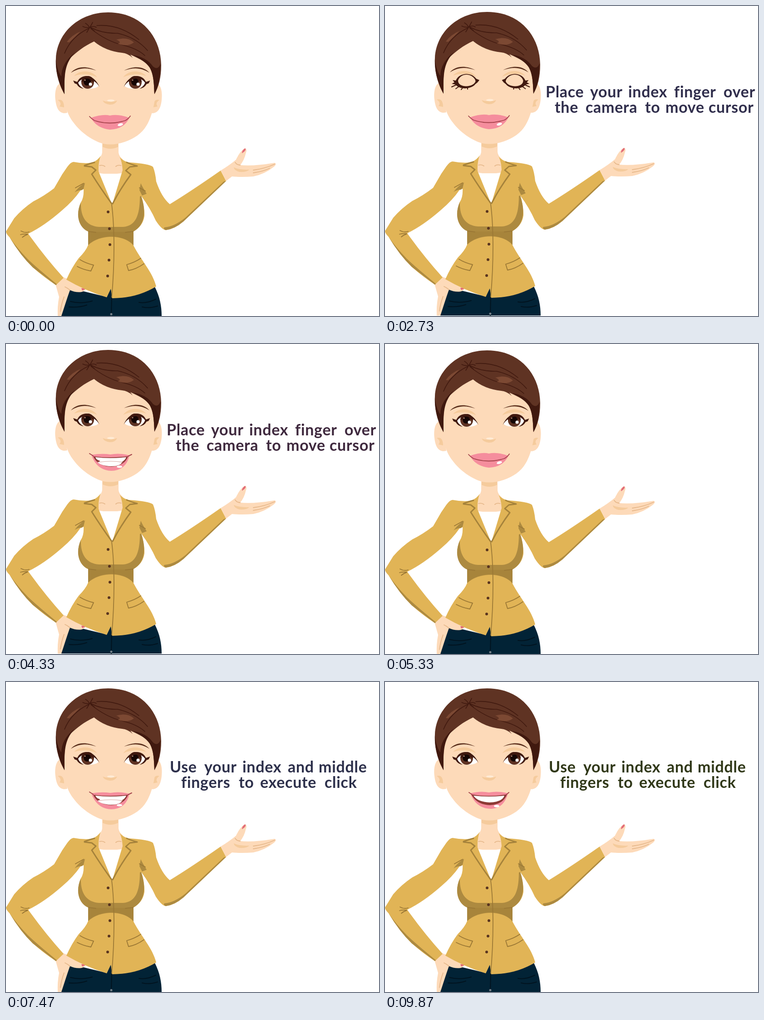
Recreate the animation shown at these times as an HTML page. Size 822 by 682 pixels, loop 9.94 s.

```html
<!DOCTYPE html>
<html lang="en">
<head>
<meta charset="utf-8">
<title>Presenter</title>
<style>
  html, body { margin: 0; width: 100%; height: 100%; overflow: hidden; background: #fff; }
  svg { display: block; width: 822px; height: 682px; }
  text { font: 700 34px Lato, "Open Sans", sans-serif; letter-spacing: .7px; font-variant-ligatures: none; }
  .skin { fill: #fddab9; }
  .tan { fill: #f5cb9c; }
  .hair { fill: #5f3323; }
  .dark { fill: #40190f; }
  .gold { fill: #e1b456; }
  .shade { fill: #ad8a40; }
  .navy { fill: #022336; }
  .lip { fill: #f58d9d; }
  .deep { fill: #8d3a35; }
  .white { fill: #fff; }
  .line { fill: none; stroke-linecap: round; stroke-linejoin: round; }
  .seam { stroke: #9b7835; stroke-width: 1.8; }
  .lapel { stroke: #a5823b; stroke-width: 3; }
  .strand { stroke: #40190f; stroke-width: 1.6; }
  .crease { stroke: #e6b88b; stroke-width: 1.8; }
  .lash { stroke: #40190f; stroke-width: 2; }
</style>
</head>
<body>
<svg viewBox="0 0 822 682">
  <defs>
    <g id="ear">
      <path class="skin" d="M130 172C114 163 106 183 109 207C111 227 119 239 135 235Z"/>
      <path class="tan" d="M114 207C124 204 128 212 128 223L118 221Q124 213 114 207Z"/>
    </g>
    <g id="brow">
      <path class="tan" d="M150 154C163 140 188 140 201 157C188 150 166 148 150 154Z"/>
      <path d="M143 147C154 134 175 130 199 142C176 134 160 136 143 147Z" fill="#5a2f1c"/>
    </g>
    <g id="white">
      <path class="white" d="M157 168C164 150 192 148 204 176C196 184 166 186 157 168Z"/>
    </g>
    <g id="lid">
      <path class="dark" d="M148 164L157 167C165 149 193 147 206 178C194 158 169 153 159 169Q162 177 171 182Q160 180 156 172L151 170Z"/>
    </g>
    <g id="shut">
      <path class="dark" d="M149 164L156 165C164 147 190 146 201 161L208 164Q205 169 199 173C190 185 163 185 156 174L147 172L153 169Z"/>
      <path class="skin" d="M161 165C167 148 191 148 199 164Q201 169 193 174C183 180 161 179 161 165Z"/>
      <path class="line lash" d="M158 174L147 179M163 178L156 183M171 181L168 185M182 181L182 184"/>
    </g>
    <g id="iris">
      <circle r="14" class="hair"/>
      <path class="dark" d="M-14 0A14 14 0 0 1 14 0Q0 -8 -14 0Z"/>
      <circle r="8" cx="-1" cy="-1" fill="#150604"/>
      <circle r="3.5" cx="6" cy="4" class="white"/>
      <circle r="1.5" cx="-6" cy="-5" fill="#b98d78"/>
    </g>
  </defs>

  <g id="woman">
    <!-- trousers and hand on hip -->
    <path class="navy" d="M139 620L222 640L231 621L235 641Q290 640 328 618C339 640 343 660 343 682H114Z"/>
    <path class="line" stroke="#01131f" stroke-width="2" d="M233 640L232 682M142 650Q165 656 190 649M139 662Q160 664 178 658M330 645Q310 655 293 652M334 660Q315 666 300 662"/>
    <circle cx="232" cy="678" r="2.5" fill="#74808a"/>
    <path class="skin" d="M109 612L127 597Q142 602 156 613L175 621Q176 626 167 629Q154 631 141 625C134 644 128 664 122 682H114Q113 660 117 640Z"/>
    <path class="line crease" d="M141 625Q135 620 130 618M128 640Q122 656 120 672"/>
    <path d="M166 621Q172 620 175 623L168 626Z" fill="#e26b78"/>

    <!-- neck and shirt -->
    <path class="skin" d="M212 294V322Q211 331 203 338V369H258V338Q249 331 248 322V294Z"/>
    <path class="tan" d="M213 302Q230 306 247 302V310Q230 318 213 310Z"/>
    <path class="line crease" d="M206 351Q213 349 218 353M254 351Q246 349 242 353"/>
    <path class="white" d="M202 367Q230 373 259 367L234 438Z"/>

    <!-- jacket -->
    <path class="gold" d="M209 329Q204 338 190 345Q169 347 149 343Q143 343 135 354L124 370L106 401Q84 418 60 430Q36 446 18 467L0 496Q0 501 8 509Q32 549 59 575Q84 597 110 614L127 598Q87 554 49 501Q84 484 123 450Q149 428 164 406L171 403Q172 421 165 432Q157 452 160 467Q165 486 181 496V526Q176 539 160 555Q145 575 133 602Q174 626 222 641L231 622L234 643Q288 643 331 617C323 585 298 560 281 527V496Q302 484 305 462Q306 443 298 418Q318 445 330 472Q343 492 352 493Q371 491 391 474L485 385L473 362Q407 408 361 436Q343 421 331 386Q329 366 324 354Q316 347 270 344Q253 339 248 328Q256 340 257 361L234 437L204 364Q203 343 209 329Z"/>
    <path class="shade" d="M165 432C164 463 176 484 205 486H258C285 484 295 462 295 419L298 418C309 450 307 482 281 496V527C260 501 206 501 181 526V496C157 485 154 455 165 432Z"/>
    <path d="M181 497H281V526C259 502 207 502 181 526Z" fill="#a07d35" opacity=".45"/>
    <path class="shade" d="M174 389Q162 396 151 410Q159 405 167 405L171 402ZM297 390Q301 399 310 413L300 417L294 405ZM352 493Q346 490 349 487Q372 485 396 465L480 386L485 385L391 474Q371 491 352 493ZM8 509Q32 549 59 575L110 614L112 612Q69 577 48 557Q24 532 8 509Z"/>
    <path class="line seam" d="M33 495Q42 500 51 497M32 503Q40 501 48 502M36 509Q42 504 47 503M153 400L171 390M294 400L307 407M182 496L198 498M280 496L263 498"/>
    <path class="line seam" d="M233 437C238 475 241 550 233 641M163 558Q176 566 193 570L187 583Q170 580 157 573M297 555Q284 564 266 569L270 582Q287 579 304 567"/>
    <path class="line lapel" d="M173 351Q186 346 195 344M173 352L189 354L198 361L189 370Q209 402 233 435M289 352Q275 348 266 344M289 352L273 354L264 362L275 371Q252 402 235 435"/>
    <g fill="#59341f">
      <circle cx="225" cy="453" r="3"/><circle cx="228" cy="490" r="3"/><circle cx="229" cy="525" r="3"/>
      <circle cx="227" cy="559" r="3"/><circle cx="224" cy="594" r="3"/>
    </g>

    <!-- open hand -->
    <path class="skin" d="M473 362Q493 350 507 338Q515 320 526 313Q532 314 529 322Q525 340 516 350Q545 353 592 345Q598 347 590 354Q570 370 545 375Q520 377 498 375L485 385Z"/>
    <path class="tan" d="M502 355Q514 361 536 360Q531 366 515 365Q503 362 502 355Z"/>
    <path class="line crease" d="M516 350Q509 350 505 344M545 361Q570 358 592 348M545 367Q567 364 581 357"/>
    <path d="M520 324Q520 317 527 313Q531 317 520 324Z" fill="#e26b78"/>

    <!-- head -->
    <use href="#ear"/><use href="#ear" transform="translate(452) scale(-1 1)"/>
    <path class="skin" d="M124 120L129 195C130 226 138 243 150 258C165 278 190 296 214 303Q230 306 246 303C269 299 292 287 305 270C316 255 324 235 329 200L332 120L192 70Z"/>
    <path class="hair" d="M129 194C118 175 108 146 110 115C113 57 163 14 225 14C296 14 341 65 342 130Q342 169 327 194C326 163 324 149 317 136C310 123 296 117 274 107L279 114Q268 104 256 103Q219 99 194 78C172 88 155 102 142 114C131 126 128 143 129 194Z"/>
    <path class="dark" d="M129 194C118 175 109 148 110 118Q113 143 122 155Q122 126 152 102C131 126 128 143 129 194ZM327 194C326 163 324 149 317 136Q306 120 279 108Q309 112 324 133Q335 142 340 128Q341 169 327 194Z"/>
    <g class="line strand">
      <path d="M169 45Q178 49 184 47Q193 43 199 47M175 38Q182 42 184 48L178 58M191 36L185 47L195 55M186 47Q213 61 246 60Q287 69 312 98M187 50Q222 78 258 86Q290 94 306 109M183 49Q144 67 129 104M200 43Q250 39 293 74"/>
    </g>
    <path d="M243 74Q267 67 282 80Q268 91 246 83Q257 80 243 74ZM134 79Q145 64 164 56Q153 68 139 80Z" fill="#865139" opacity=".75"/>
    <use href="#brow"/><use href="#brow" transform="translate(459) scale(-1 1)"/>
    <g id="open">
      <use href="#white"/><use href="#white" transform="translate(465.5) scale(-1 1)"/>
      <use href="#iris" x="180" y="168"/><use href="#iris" x="285" y="168"/>
      <use href="#lid"/><use href="#lid" transform="translate(465.5) scale(-1 1)"/>
    </g>
    <g id="closed">
      <use href="#shut"/><use href="#shut" transform="translate(465.5) scale(-1 1)"/>
    </g>
    <path class="tan" d="M213 208Q220 211 229 210Q238 211 245 208Q241 217 229 217Q217 216 213 208Z"/>
    <ellipse cx="231" cy="208" rx="8" ry="2.5" fill="#ffebd5"/>

    <!-- mouth poses -->
    <g id="C">
      <path class="lip" d="M187 246Q213 237 229 241Q248 237 272 246Q260 271 229 272Q200 269 187 246Z"/>
      <path class="line" stroke="#a5434b" stroke-width="1.8" d="M184 243Q188 248 195 252Q228 263 263 252Q270 248 274 242"/>
      <ellipse cx="252" cy="261" rx="6" ry="2.8" class="white" transform="rotate(-15 252 261)"/>
    </g>
    <g id="W">
      <path class="lip" d="M188 245Q211 241 230 244Q250 240 272 246Q265 279 232 280Q200 279 188 245Z"/>
      <path class="deep" d="M192 248Q229 253 269 248Q262 269 232 271Q202 270 192 248Z"/>
      <path class="white" d="M197 250Q229 254 265 250Q263 256 256 260Q254 270 231 270Q209 269 202 261Q207 260 207 258Q199 256 197 250Z"/>
      <path class="line" stroke="#d8a9a2" stroke-width="1.2" d="M205 261Q231 257 257 261"/>
      <path class="line" stroke="#a5434b" stroke-width="2" d="M184 242L192 247M277 244L269 248"/>
      <ellipse cx="250" cy="271" rx="6" ry="2.5" class="white"/>
    </g>
    <g id="N">
      <path class="lip" d="M191 244Q215 239 231 243Q250 239 273 246Q263 277 238 279Q207 281 191 244Z"/>
      <path class="deep" d="M195 247Q230 252 269 248Q261 270 233 271Q207 269 195 247Z"/>
      <path class="white" d="M202 250Q231 252 263 250Q258 260 252 261Q231 255 211 263ZM209 265Q230 259 253 263Q247 270 230 270Q215 270 209 265Z"/>
      <path class="line" stroke="#a5434b" stroke-width="2" d="M188 240L195 246M275 244L269 248"/>
      <ellipse cx="246" cy="272" rx="6" ry="2.5" class="white"/>
    </g>
    <g id="D">
      <path class="lip" d="M188 245Q210 239 229 243Q249 239 271 245Q262 278 234 279Q201 279 188 245Z"/>
      <path class="deep" d="M190 247Q228 254 269 247Q260 270 231 271Q202 270 190 247Z"/>
      <path class="white" d="M195 250Q229 254 263 250Q259 264 230 265Q203 263 195 250Z"/>
      <path class="line" stroke="#a5434b" stroke-width="2" d="M185 243L191 247M273 243L267 248"/>
      <ellipse cx="246" cy="273" rx="6" ry="2.8" class="white"/>
    </g>
  </g>

  <g id="move">
    <text y="201"><tspan x="354">Place</tspan> <tspan x="452">your</tspan> <tspan x="536">index</tspan> <tspan x="637">finger</tspan> <tspan x="746">over</tspan></text>
    <text y="235"><tspan x="374">the</tspan> <tspan x="442">camera</tspan> <tspan x="573">to</tspan> <tspan x="618">move</tspan> <tspan x="713">cursor</tspan></text>
  </g>
  <g id="click">
    <text y="199"><tspan x="361">Use</tspan> <tspan x="437">your</tspan> <tspan x="521">index</tspan> <tspan x="621">and</tspan> <tspan x="689">middle</tspan></text>
    <text y="233"><tspan x="386">fingers</tspan> <tspan x="513">to</tspan> <tspan x="560">execute</tspan> <tspan x="702">click</tspan></text>
  </g>
</svg>
<script>
const LOOP = 9940, FPS = 15, HALF = 75, LAST = 148;
const SPEECH = "CCCCCWDCDNCWDNCWNDWDCNWDCWNDCWNDWCNWDC";
const BLINKS = [7, 41, 71];
const $ = id => document.getElementById(id);
const show = (id, on) => $(id).setAttribute("display", on ? "inline" : "none");

// Dark tone of steady brightness; the angle turns its hue.
function tone(deg) {
  const a = deg * Math.PI / 180, u = 13 * Math.cos(a), v = 13 * Math.sin(a), y = 50;
  const rgb = [y + v / 0.877, y - 0.394 * u - 0.581 * v, y + u / 0.492];
  return `rgb(${rgb.map(Math.round)})`;
}

function draw(ms) {
  const step = Math.min(LAST, Math.floor((ms + 4) * FPS / 1000));
  const second = step >= HALF, k = step % HALF;
  const pose = k ? SPEECH[(k - 1) >> 1] : "C";
  for (const p of "CWND") show(p, p === pose);

  const blink = BLINKS.includes(k);
  show("open", !blink);
  show("closed", blink);

  const settle = Math.min(3, Math.floor((k + 1) / 2)) / 3;
  $("woman").setAttribute("transform", `translate(0 ${second ? settle - 1 : -settle})`);

  const talking = k >= 11;
  show("move", talking && !second);
  show("click", talking && second);
  $("move").setAttribute("fill", tone(208 - 12 * (step - 23)));
  $("click").setAttribute("fill", tone(54 - 4.2 * (step - 94)));
}

const start = performance.now();
function tick() {
  draw((performance.now() - start) % LOOP);
  requestAnimationFrame(tick);
}
tick();
</script>
</body>
</html>
```
